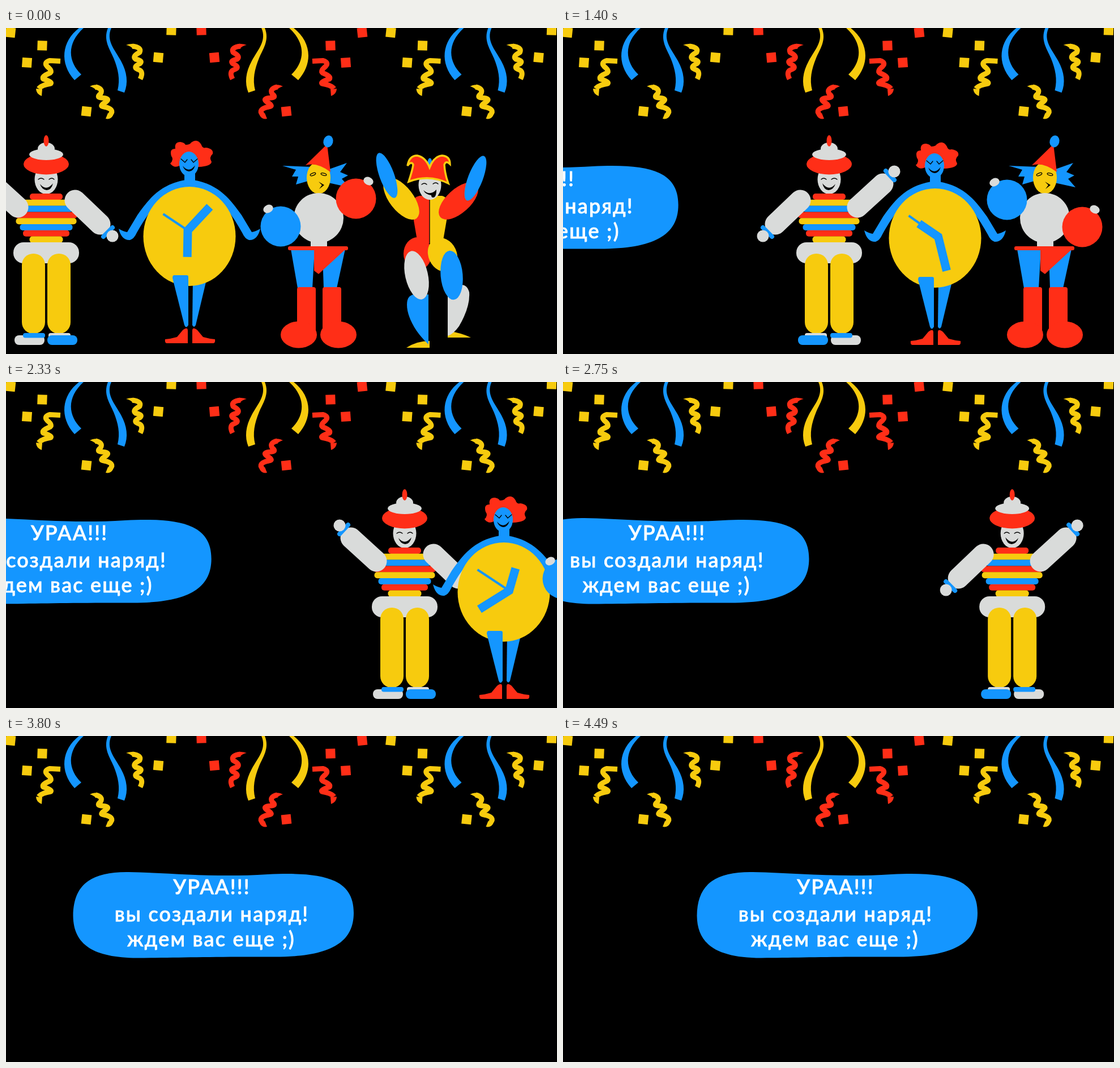
Write an HTML page that moves like this. It is 973 px wide and 575 px high and loops after 4.96 s.

```html
<!DOCTYPE html>
<html lang="ru">
<head>
<meta charset="utf-8">
<style>
html, body { margin: 0; width: 100%; height: 100%; overflow: hidden; background: #000; }
svg { display: block; width: 973px; height: 575px; }
.b { fill: #1496ff; } .r { fill: #ff2e17; } .y { fill: #f7cb0e; } .g { fill: #d9dbda; }
.line { fill: none; stroke: #000; stroke-width: 1.3; stroke-linecap: round; }
.band { stroke: #1496ff; stroke-width: 8; stroke-linecap: round; }
.arm { stroke: #d9dbda; stroke-width: 37; stroke-linecap: round; }
.hand { stroke: #1496ff; }
.curl { fill: none; stroke: currentColor; stroke-width: 9; stroke-linejoin: round; }
text { font: 500 36px Lato, "Open Sans", sans-serif; letter-spacing: 2.2px; fill: #fff; stroke: #fff; stroke-width: .9px; text-anchor: middle; }
</style>
</head>
<body>
<svg viewBox="0 0 973 575">
  <defs>
    <g id="confetti">
      <g id="squares" fill="currentColor"></g>
      <path class="curl" d="M96 58.500L77 57.500Q66 61 73 68Q84 77 76 80Q62 86 66 90Q82 95 79 98Q62 101 58 107"/>
      <path class="curl" d="M223 32Q240 34 236 43Q222 50 229 55Q243 58 236 63Q223 69 233 73Q244 76 237 90"/>
      <path class="curl" d="M158 104Q172 107 167 116Q159 122 168 123Q185 124 177 130Q163 138 173 139Q193 143 184 153"/>
      <path fill="currentColor" d="M212 30Q225 25 234 32L225 37Q219 31 212 30ZM148 103Q158 97 167 104L159 109Q153 104 148 103ZM53 107L64 108L63 120Q53 116 53 107ZM180 150L189 154Q185 162 176 160Z"/>
      <g fill="var(--ribbon)">
        <path d="M129 0C98 24 94 62 121 92L133 82C110 60 106 28 137 0Z"/>
        <path d="M180 0C171 22 184 38 190 53C198 73 202 90 197 110L209 114C216 97 214 78 203 58C192 38 176 22 186 0Z"/>
      </g>
    </g>
    <path id="shoe" class="r" d="M312 533Q321 526 321 534V556H284Q280 556 281 549Q292 548 302 545Z"/>
    <path id="limb" class="b" d="M317 268C270 276 250 305 232 330L214 360Q207 359 199 354Q204 375 219 374Q226 372 231 361C246 334 262 310 290 290L324 285V268Z"/>
  </defs>

  <use href="#confetti" color="#f7cb0e" style="--ribbon:#1496ff"/>
  <use href="#confetti" color="#ff2e17" style="--ribbon:#f7cb0e" transform="matrix(-1 0 0 1 637 0)"/>
  <use href="#confetti" color="#f7cb0e" style="--ribbon:#1496ff" transform="translate(671.500 0)"/>

  <g id="stacker">
    <ellipse class="g" cy="267" rx="20.500" ry="26"/>
    <path class="line" d="M-14 267q5-4 10 0M5 267q5-4 9 0"/>
    <path d="M-11 275Q0 289 12 274Q9 286 1 286Q-8 285-11 275Z"/>
    <ellipse class="r" cy="240" rx="40" ry="18.500"/>
    <ellipse class="g" cy="213" rx="15" ry="11"/>
    <ellipse class="g" cy="223" rx="30" ry="10"/>
    <ellipse class="r" cy="199" rx="4.500" ry="10"/>
    <g id="bars"></g>
    <rect class="g" x="-58" y="378" width="116" height="37" rx="18"/>
    <rect class="y" x="-43" y="398" width="41" height="141" rx="20"/>
    <rect class="y" x="2" y="398" width="41" height="141" rx="20"/>
    <rect class="g" x="-56" y="542" width="53" height="17" rx="8"/>
    <rect class="b" x="-41" y="538" width="39" height="8.500" rx="4"/>
    <rect class="g" x="4" y="538" width="39" height="8.500" rx="4"/>
    <rect class="b" x="2" y="542" width="53" height="17" rx="8"/>
    <path class="arm" d="M-95 275L-50 316M51 304L95 346"/>
    <path class="band" d="M-115 268L-100 252M101 368L117 352"/>
    <circle class="g" cx="-115" cy="253" r="10.500"/>
    <circle class="g" cx="117" cy="367" r="10.500"/>
  </g>

  <g id="clock">
    <path class="r" d="M306 243Q297 248 290 239Q297 232 292 226Q288 213 299 213Q297 201 308 201Q315 202 317 206Q325 206 327 202Q338 194 345 206Q347 213 353 211Q367 213 365 222Q358 228 363 236Q362 244 340 245Z"/>
    <use href="#limb"/><use href="#limb" transform="matrix(-1 0 0 1 648 0)"/>
    <rect class="b" x="315" y="252" width="19" height="30"/>
    <ellipse class="b" cx="323" cy="240" rx="17" ry="22"/>
    <path class="line" d="M309 231l7 6 4-5M327 232l4 5 7-6"/>
    <path d="M312 243Q323 257 334 242Q331 253 323 253Q315 252 312 243Z"/>
    <path class="b" d="M330 440H355L335 524Q332 530 329 524Z"/>
    <ellipse class="y" cx="324" cy="367.500" rx="81.500" ry="87.500"/>
    <path class="b" d="M297 436H319Q322 436 322 439V524Q318 531 315 524L294 441Q294 436 297 436Z"/>
    <use href="#shoe"/><use href="#shoe" transform="matrix(-1 0 0 1 650 0)"/>
    <path id="thin" class="hand" stroke-width="4"/>
    <path id="thick" class="hand" fill="none" stroke-width="15"/>
  </g>

  <g id="strong">
    <path class="b" d="M540 245L488 243L512 250L505 262L516 262L512 276L540 268L565 272L606 281L593 266L604 260L590 254L602 238L568 250Z"/>
    <ellipse class="y" cx="552" cy="264" rx="21" ry="28.500"/>
    <path class="r" d="M567 205L529 242Q549 236 573 254Z"/>
    <ellipse class="b" cx="569" cy="200" rx="8.500" ry="10.500" transform="rotate(15 569 200)"/>
    <ellipse class="line" cx="542" cy="258" rx="5" ry="2" transform="rotate(-22 542 258)"/>
    <ellipse class="line" cx="561" cy="258" rx="5" ry="2" transform="rotate(15 561 258)"/>
    <path d="M552 271L562 277L553 284L558 277Z"/>
    <rect class="g" x="538" y="370" width="29" height="18"/>
    <circle class="g" cx="552" cy="335" r="44"/>
    <path class="b" d="M503 390H545L541 459H515ZM559 400L599 390L584 459H561Z"/>
    <path class="r" d="M544 389H601L552 434L544 428Z"/>
    <rect class="r" x="498" y="385" width="106" height="7" rx="3"/>
    <rect class="r" x="514" y="457" width="33" height="85" rx="4"/>
    <rect class="r" x="559" y="457" width="33" height="85" rx="4"/>
    <ellipse class="r" cx="517" cy="541" rx="32" ry="23.500"/>
    <ellipse class="r" cx="587" cy="541" rx="32" ry="23.500"/>
    <g id="leftBall">
      <circle class="b" cx="485" cy="350" r="35.500"/>
      <ellipse class="g" cx="463" cy="319" rx="9" ry="7" transform="rotate(-25 463 319)"/>
    </g>
    <g id="rightBall">
      <circle class="r" cx="618" cy="301" r="35.500"/>
      <ellipse class="g" cx="640" cy="270" rx="9" ry="7" transform="rotate(25 640 270)"/>
    </g>
  </g>

  <g id="jester">
    <path class="r" d="M748 296H730Q715 300 716 316L727 380H748Z"/>
    <path class="y" d="M748 296H770Q783 300 782 316L771 380H748Z"/>
    <ellipse class="r" cx="727" cy="398" rx="25" ry="29"/>
    <ellipse class="y" cx="771" cy="400" rx="25" ry="31" transform="rotate(-25 771 400)"/>
    <path class="line" d="M748 298V380"/>
    <path class="y" d="M707 564Q725 552 748 552V564ZM780 534Q805 538 821 546H780Z"/>
    <path class="b" d="M746 470V558C724 538 708 510 708 488Q708 472 720 470Z"/>
    <path class="g" d="M780 543V472L795 455Q813 448 818 466Q820 492 800 526Q790 540 780 543Z"/>
    <ellipse class="g" cx="725" cy="436" rx="20" ry="43.500" transform="rotate(-13 725 436)"/>
    <ellipse class="b" cx="787" cy="436" rx="19.500" ry="43.500" transform="rotate(-5 787 436)"/>
    <ellipse class="y" cx="698" cy="301" rx="21" ry="44" transform="rotate(-38 698 301)"/>
    <ellipse class="r" cx="799" cy="305" rx="21" ry="43" transform="rotate(48 799 305)"/>
    <ellipse class="b" cx="672.500" cy="260" rx="13" ry="42" transform="rotate(-20 672.500 260)"/>
    <ellipse class="b" cx="829" cy="265" rx="13" ry="42" transform="rotate(21 829 265)"/>
    <ellipse class="g" cx="748.500" cy="277" rx="20" ry="26"/>
    <path class="line" d="M734 276q5-4 9 0M754 275q5-4 9 0"/>
    <path d="M737 286Q749 297 760 285Q760 299 754 299Q751 299 751 295Q741 294 737 286Z"/>
    <ellipse class="b" cx="748.500" cy="238" rx="4" ry="8.500"/>
    <path class="r" stroke="#f7cb0e" stroke-width="3.500" d="M711 271Q718 250 719 241Q716 234 709 243Q712 225 726 225Q741 228 748 246Q756 226 770 225Q784 226 784 240Q777 233 774 241Q775 258 781 274Q747 257 711 271Z"/>
  </g>

  <g id="bubble">
    <path class="b" d="M236.500 317C237 262 268 239 335 240C415 241.500 485 250 580 244C680 239 732 252 732 312C732 366 688 390 590 389.500C480 389 420 391 350 391.500C272 391 237 368 236.500 317Z"/>
    <text x="481.500" y="279">УРАА!!!</text>
    <text x="481.500" y="327">вы создали наряд!</text>
    <text x="480.500" y="371">ждем вас еще ;)</text>
  </g>
</svg>

<script>
const LOOP = 4960, ARRIVE = 4490, START = 300, SPEED = 0.171;
const $ = id => document.getElementById(id);
const move = (id, x, y = 0) => $(id).setAttribute('transform', `translate(${x} ${y})`);
const show = (id, on) => $(id).style.display = on ? '' : 'none';

$('squares').innerHTML = [[8, 8, 6], [64, 31, 2], [37, 61, 4], [269, 52, 5], [292, 4, 2], [142, 147, 6]]
  .map(([x, y, a]) => `<rect x="${x - 8.5}" y="${y - 8.5}" width="17" height="17" transform="rotate(${a} ${x} ${y})"/>`).join('');

$('bars').innerHTML = [58, 82, 92, 110, 107, 93, 82, 59]
  .map((w, i) => `<rect class="${'rybrybry'[i]}" x="${-w / 2}" y="${292 + i * 10.8}" width="${w}" height="11" rx="5"/>`).join('');

const strongX = [551, 662, 756, 850, 949, 1049, 1150];
const leftLift = [0, -8, -24, -47, -47, 0, 0];
const rightDrop = [0, 5, 24, 50, 47, 0, 0];
const jesterX = [749, 823, 946, 1072];
const bob = [0, 3, -3];

function drawStacker(t) {
  const k = t < START ? 0 : 1 + Math.floor((t - START) / 274);
  const odd = k % 2;
  const x = odd ? 66 + 80.8 * k : k ? 64 + 80 * k : 71;
  show('stacker', t < 3490);
  $('stacker').setAttribute('transform', `translate(${x} 0) scale(${odd ? -1 : 1} 1)`);
}

function drawClock(t) {
  const k = Math.floor(t / 390);
  move('clock', k * 111, k ? 3 : 0);
  show('clock', k < 7);
  const cx = 321 + (k && 2.5 + k * 2), cy = k ? 365 : 357;
  const angle = k ? 58 + 36 * k : 43;
  const tip = (a, r) => {
    a *= Math.PI / 180;
    return `${cx + r * Math.sin(a)} ${cy - r * Math.cos(a)}`;
  };
  $('thin').setAttribute('d', `M277.5 328L${cx} ${cy}`);
  $('thick').setAttribute('d', `M${tip(angle, k ? 62 : 57)}L${cx} ${cy}L${tip(angle + 138, k ? 41 : 47)}`);
}

function drawPair(t) {
  const k = Math.floor(t / 420), s = Math.min(k, 6), j = Math.min(k, 3);
  move('strong', strongX[s] - 551, bob[s % 3]);
  move('leftBall', 0, leftLift[s]);
  move('rightBall', 0, rightDrop[s]);
  show('strong', k < 6);
  move('jester', jesterX[j] - 749, bob[j % 3] * 1.2);
  show('jester', k < 3);
}

function frame(now) {
  const t = now % LOOP;
  const step = Math.floor((t - 20) / 30) * 30 + 20;
  drawStacker(t);
  drawClock(t);
  drawPair(t);
  show('bubble', t >= START);
  move('bubble', -SPEED * Math.max(0, ARRIVE - step));
}

const origin = performance.now();
(function tick() {
  frame(performance.now() - origin);
  requestAnimationFrame(tick);
})();
</script>
</body>
</html>
```
